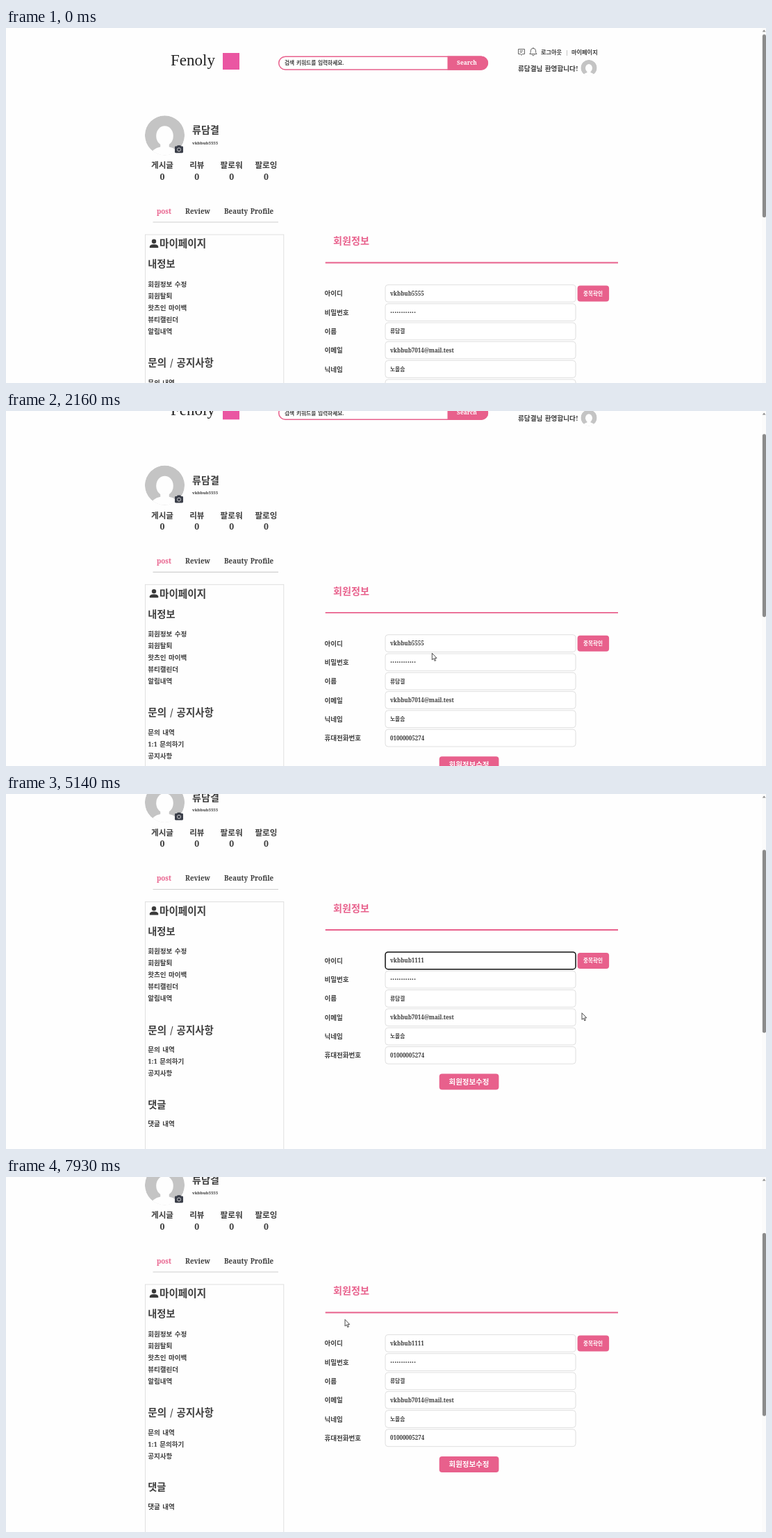
An HTML page that plays this animation: 1094 px wide and 512 px high, repeating every 8000 ms.

```html
<!DOCTYPE html>
<html lang="ko">
<head>
<meta charset="utf-8">
<title>회원정보</title>
<style>
html, body { margin: 0; width: 100%; height: 100%; overflow: hidden; background: #fefefe; }
svg { display: block; }
text { font-family: 'Noto Serif', 'Noto Sans CJK KR', serif; font-weight: 600; fill: #3d3d3d; white-space: pre; word-spacing: .1em; }
.ui text { font-family: 'Noto Sans', 'Noto Sans CJK KR', sans-serif; font-weight: 400; fill: #2b2b2b; word-spacing: 0; }
.logo { font-family: 'Liberation Serif', serif; font-weight: 400; fill: #222; }
.pink { fill: #e8608c; }
.white, .ui .white { fill: #fff; }
.bold { font-weight: 700; }
.field { fill: #fff; stroke: #dcdcdc; stroke-width: .9; }
.field.focus { stroke: #111; stroke-width: 1.5; }
</style>
</head>
<body>
<svg id="stage" width="1094" height="512" viewBox="0 0 1094 512"></svg>
<script>
const LOOP = 8000;
const ID = 'vkbbub';
const NAME = '류담결';
const saved = ['7014', '5093', '1111', '5555', 'momo12', '8888'];

// text placed by its vertical centre
const text = (x, cy, size, str, cls = '', more = '') =>
  `<text x="${x}" y="${cy + size * 0.37}" font-size="${size}" class="${cls}" ${more}>${str}</text>`;
const mid = (x, cy, size, str, cls = '', more = '') =>
  text(x, cy, size, str, cls, 'text-anchor="middle" ' + more);
const rect = (x, y, w, h, r, more) =>
  `<rect x="${x}" y="${y}" width="${w}" height="${h}" rx="${r}" ${more}/>`;
const line = (x1, x2, y, color, w) =>
  `<path d="M${x1} ${y}H${x2}" stroke="${color}" stroke-width="${w}"/>`;
const avatar = (cx, cy, r) =>
  `<g transform="translate(${cx} ${cy}) scale(${r / 100})" clip-path="url(#disc)">
    <circle r="100" fill="#c4c4c4"/>
    <ellipse cy="3" rx="43" ry="50" fill="#fefefe"/>
    <path d="M-22 40H22V58Q62 66 74 100H-74Q-62 66 -22 58Z" fill="#fefefe"/></g>`;

const header = () => `
  ${text(237, 45.5, 23, 'Fenoly', 'logo')}
  ${rect(312, 36, 24, 24, 0, 'fill="#ea56a2"')}
  ${rect(392.7, 41.2, 300.6, 18.8, 9.4, 'fill="#fff" stroke="#e8608c" stroke-width="1.5"')}
  <path d="M635.5 40.4H684a10.1 10.1 0 0 1 0 20.4H635.5Z" class="pink"/>
  ${text(401, 50.5, 7.7, '검색 키워드를 입력하세요.')}
  ${mid(663.5, 50, 8.3, 'Search', 'white bold')}
  <g fill="none" stroke="#666" stroke-width="1">
    <path d="M737.5 30.5H746.5V37.5H743.5L742 39.3L740.5 37.5H737.5ZM739.5 32.9H744.5M739.5 35H743"/>
    <path d="M753.8 37.5L755.2 35.5V33A3.7 3.7 0 0 1 762.6 33V35.5L764 37.5ZM757.4 38.5a1.5 1.3 0 0 0 3 0M758.9 28V29.3"/>
  </g>
  ${text(770, 35, 8.2, '로그아웃')}
  ${mid(807.5, 35, 7, '|', '', 'opacity=".6"')}
  ${text(814, 35, 8.2, '마이페이지')}
  ${text(737, 58.5, 9.6, NAME + '님 환영합니다!')}
  ${avatar(839, 57.5, 11.6)}`;

const profile = () => `
  ${avatar(228.5, 154.8, 28.6)}
  ${rect(243, 170.6, 12, 9.6, 1.4, 'fill="#3b3f4a"')}
  ${rect(246.3, 169.2, 5.4, 3, 1, 'fill="#3b3f4a"')}
  <circle cx="249" cy="175.4" r="2.5" fill="none" stroke="#ddd" stroke-width=".9"/>
  ${text(268, 147, 14.1, NAME, 'bold')}
  ${text(268, 165.3, 6.1, ID + '5555', 'bold')}
  ${['게시글', '리뷰', '팔로워', '팔로잉'].map((s, i) =>
    mid(225 + i * 49.8, 198, 11.6, s) + mid(225 + i * 49.8, 214, 12.4, '0')).join('')}
  ${text(217, 264, 9.8, 'post', 'pink')}
  ${text(258, 264, 9.8, 'Review')}
  ${text(314, 264, 9.8, 'Beauty Profile')}
  ${line(211.5, 392, 280, '#cfcfcf', 1.2)}`;

const menu = [
  [340, 14.2, '내정보'], [369, 9.5, '회원정보 수정'], [386, 9.5, '회원탈퇴'],
  [403, 9.5, '왓츠인 마이백'], [420, 9.5, '뷰티캘린더'], [437, 9.5, '알림내역'],
  [482.7, 14.5, '문의 / 공지사항'], [511, 9.5, '문의 내역'], [528.2, 9.5, '1:1 문의하기'],
  [545.4, 9.5, '공지사항'], [590, 14.2, '댓글'], [618, 9.5, '댓글 내역']
];
const sidebar = () => `
  ${rect(200.4, 298, 199.4, 420, 0, 'fill="none" stroke="#dcdcdc" stroke-width=".9"')}
  <circle cx="213" cy="307.8" r="3.2" fill="#3a3a3a"/>
  <path d="M206.8 317V315Q207.5 312 213 312T219.2 315V317Z" fill="#3a3a3a"/>
  ${text(221, 311, 14.6, '마이페이지', 'bold')}
  ${menu.map(([y, size, s]) => text(204.3, y, size, s, size > 12 ? 'bold' : '')).join('')}`;

const rows = [
  ['아이디', ''], ['비밀번호', '·'.repeat(12)], ['이름', NAME],
  ['이메일', ID + '7014@mail.test'], ['닉네임', '노을솜'], ['휴대전화번호', '01000005274']
];
const rowY = i => 382.8 + i * 27.3;
const form = () => `
  ${text(471, 307, 14.1, '회원정보', 'bold pink')}
  ${line(459.7, 881, 338.5, '#e8608c', 1.8)}
  ${rows.map(([label, value], i) => text(458.5, rowY(i), 9.5, label) +
    rect(546, rowY(i) - 12.4, 274, 24.8, 4, `class="field" id="field${i}"`) +
    text(553, rowY(i), i === 1 ? 10.5 : i === 2 || i === 4 ? 7.7 : 8, value, '', `id="value${i}"`)).join('')}
  <path id="caret" d="M0 378.4V387.6" stroke="#222" stroke-width=".8"/>
  ${rect(822.6, 371.5, 45.5, 23, 4, 'class="pink" id="check"')}
  ${mid(845, 383, 7.6, '중복확인', 'white bold')}
  ${rect(623.7, 546, 85.7, 23, 4, 'class="pink"')}
  ${mid(666.5, 557.5, 10.5, '회원정보수정', 'white bold')}`;

const dialog = () => `<g id="dialog" class="ui">
  ${rect(418.5, -60, 257, 121.3, 8, 'fill="#fff" stroke="#c9cccf" stroke-width=".8" filter="url(#shade)"')}
  ${text(430.7, 12.5, 7.7, '사용가능한 아이디입니다. 사용하시겠습니까?')}
  ${rect(584.6, 26.4, 39, 23.6, 11.8, 'fill="#fff" stroke="#0b57d0" stroke-width="1.3"')}
  ${rect(586.4, 28, 35.4, 20.4, 10.2, 'fill="#0b50c4"')}
  ${mid(604, 38.2, 7.6, '확인', 'white')}
  ${rect(627.3, 27.6, 36, 21.2, 10.6, 'fill="#d3e3fd"')}
  ${mid(645.3, 38.2, 7.6, '취소')}</g>`;

const cursors = `
  <g id="arrow"><path d="M0 0V9.6L2.2 7.6L3.8 11.2L5.3 10.5L3.8 7.1H6.7Z" fill="#fff" stroke="#222" stroke-width=".8"/></g>
  <g id="beam"><path d="M-2.3 -4.8H-.6L0 -4.3L.6 -4.8H2.3M0 -4.3V4.3M-2.3 4.8H-.6L0 4.3L.6 4.8H2.3" fill="none" stroke="#222" stroke-width=".9"/></g>
  <g id="hand"><path d="M-1 .8Q0 -.7 1 .8V5L5 6Q6.2 6.4 6 8L5.2 11V13.5H-.6V12L-3.4 8.2Q-3.3 6.6 -1 8Z" fill="#fff" stroke="#222" stroke-width=".8" stroke-linejoin="round"/></g>`;

document.getElementById('stage').innerHTML = `
  <defs>
    <clipPath id="disc"><circle r="100"/></clipPath>
    <filter id="shade" x="-10%" y="-10%" width="120%" height="125%">
      <feDropShadow dx="0" dy=".8" stdDeviation=".9" flood-color="#000" flood-opacity=".22"/></filter>
  </defs>
  <g id="page">${header()}${profile()}${sidebar()}${form()}</g>
  ${rect(1088, 0, 6, 512, 0, 'fill="#fbfbfb"')}
  <path d="M1088.8 5.5H1093.6L1091.2 2.4Z" fill="#8b8b8b"/>
  ${rect(1088.9, 0, 5.1, 264, 2.4, 'id="thumb" fill="#8b8b8b"')}
  <g id="popup" class="ui">
    ${rect(602, 353, 89, 10, 2, 'id="sheet" fill="#fff" stroke="#e2e2e2" stroke-width=".6" filter="url(#shade)"')}
    ${saved.map(s => text(608.5, 0, 7.1, ID + s)).join('')}
  </g>
  ${dialog()}${cursors}`;

const el = id => document.getElementById(id);
const show = (node, on) => node.setAttribute('visibility', on ? 'visible' : 'hidden');
const clamp = u => Math.max(0, Math.min(1, u));
const glide = (t, start, length) => 1 - (1 - clamp((t - start) / length)) ** 3;
const scrollAt = t => 47.7 * glide(t, 1040, 220) + 95.3 * glide(t, 4910, 280);

// time, x, y of the pointer
const path = [
  [390, 870, 67], [460, 715, 122], [540, 570, 172], [680, 572, 175], [1150, 632, 223.5],
  [1470, 640, 297], [1600, 662, 335], [1800, 610, 398], [1960, 575, 392], [2280, 636, 324],
  [4240, 636, 324], [4560, 850, 336], [4680, 850, 340], [4870, 764, 367], [5140, 829, 316],
  [5480, 837, 243], [5900, 837, 243], [6370, 613, 38], [6850, 613, 38], [7250, 638, 105],
  [7650, 665, 162], [7720, 683, 168], [7790, 590, 285], [7860, 462, 270], [7930, 488, 205.5]
];
function pointerAt(t) {
  const i = path.findIndex(p => p[0] > t);
  if (i < 0) return path[path.length - 1].slice(1);
  const [t0, x0, y0] = path[i - 1], [t1, x1, y1] = path[i];
  const u = (t - t0) / (t1 - t0);
  return [x0 + (x1 - x0) * u, y0 + (y1 - y0) * u];
}

const keys = [
  [0, '5555'], [2890, '555'], [3230, '55'], [3300, '5'], [3370, ''],
  [3770, '1'], [3920, '11'], [3980, '111'], [4040, '1111']
];
const typedAt = t => keys.filter(k => k[0] <= t).pop()[1];

const options = [...document.querySelectorAll('#popup text')];
function drawPopup(t, typed) {
  const open = t >= 2890 && t < 4040;
  let n = 0;
  options.forEach((o, i) => {
    const hit = open && saved[i].startsWith(typed);
    show(o, hit);
    if (hit) o.setAttribute('y', 366 + 20.6 * n++ + 2.6);
  });
  show(el('sheet'), open);
  el('sheet').setAttribute('height', 5 + 20.6 * n);
}

function drawPointer(t, scroll, modal) {
  let kind = '';
  if (t >= 390) {
    const [x, y] = pointerAt(t), py = y + scroll;
    const inField = x > 546 && x < 820 && rows.some((_, i) => Math.abs(py - rowY(i)) < 12.4);
    const inCheck = x > 822 && x < 868 && Math.abs(py - 383) < 12;
    kind = modal && t > 5900 ? 'arrow' : inField ? 'beam' : inCheck ? 'hand' : 'arrow';
    el(kind).setAttribute('transform', `translate(${x} ${y})`);
  }
  for (const k of ['arrow', 'beam', 'hand']) show(el(k), k === kind);
  return kind;
}

function draw(t) {
  const scroll = scrollAt(t), typed = typedAt(t);
  const focus = t >= 2350 && t < 5560;
  el('page').setAttribute('transform', `translate(0 ${-scroll})`);
  el('thumb').setAttribute('y', 9.3 + scroll * 0.5);

  const id = el('value0');
  id.textContent = ID + typed;
  el('caret').setAttribute('transform', `translate(${553.7 + id.getComputedTextLength()} 0)`);
  show(el('caret'), focus && t < 4540);
  el('field0').classList.toggle('focus', focus);
  drawPopup(t, typed);

  const fade = clamp((t - 5690) / 100) * (1 - clamp((t - 6520) / 130));
  el('dialog').setAttribute('opacity', fade);
  const kind = drawPointer(t, scroll, fade > 0);
  const hover = kind === 'hand' || (t >= 5480 && t < 6580);
  el('check').style.fill = hover ? '#d4517b' : '';
}

const start = performance.now();
function tick() {
  draw((performance.now() - start) % LOOP);
  requestAnimationFrame(tick);
}
tick();
</script>
</body>
</html>
```
